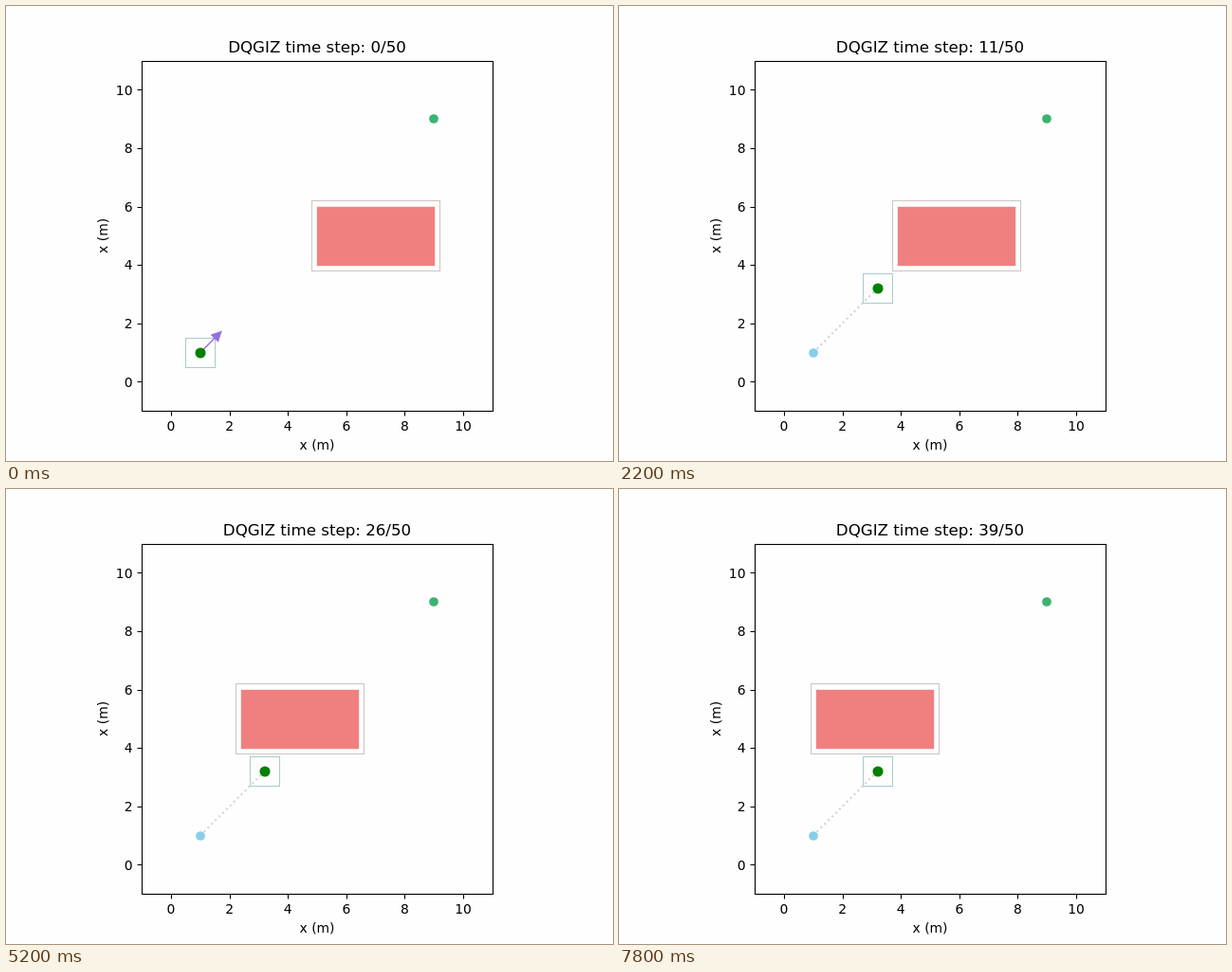
An HTML page that plays this animation: 640x480 px, repeating every 8000 ms.

```html
<!DOCTYPE html>
<html lang="en">
<head>
<meta charset="utf-8">
<title>Path planning plot</title>
<style>
  html, body { margin: 0; width: 100%; height: 100%; overflow: hidden; background: #fefefe; }
  svg { display: block; width: 640px; height: 480px; }
  text { font: 13.89px "DejaVu Sans", sans-serif; fill: #000; text-anchor: middle; }
  #title { font-size: 16.67px; }
  #yTicks text { text-anchor: end; }
  .axis { fill: none; stroke: #000; stroke-width: 1.11; }
  .outline { fill: none; stroke-width: 1; }
</style>
</head>
<body>
<svg viewBox="0 0 640 480">
  <rect id="margin" class="outline" stroke="#cdc4c4"/>
  <rect id="obstacle" fill="#f08080" stroke="#f08080" stroke-width="1.39"/>
  <rect id="robotBox" class="outline" stroke="#a8cccb"/>
  <path id="arrow" fill="#9370db" stroke="#9370db" stroke-width="1.39"/>
  <path id="trail" fill="none" stroke="#d3d3d3" stroke-width="2.08" stroke-dasharray="2.08 3.44"/>
  <circle id="start" r="4.86" fill="#87ceeb"/>
  <circle id="goal" r="4.86" fill="#3cb371"/>
  <circle id="robot" r="5.56" fill="#008000"/>
  <rect id="frame" class="axis"/>
  <path id="ticks" class="axis"/>
  <g id="xTicks"></g>
  <g id="yTicks"></g>
  <text x="328" y="468">x (m)</text>
  <text transform="translate(107 242.4) rotate(-90)">x (m)</text>
  <text id="title" x="328" y="49"></text>
</svg>
<script>
const STEP_MS = 200, STEPS = 40, TOTAL = 50;
const STOP_STEP = 11;
const UNIT = 30.8;

const $ = id => document.getElementById(id);
const px = x => 174 + UNIT * x;
const py = y => 396.4 - UNIT * y;
const snap = v => Math.floor(v + 0.5 + 1e-6) + 0.5;

function set(id, attrs) {
  for (const key in attrs) $(id).setAttribute(key, attrs[key]);
}

// Rectangle given by its data bounds, aligned to pixel centres.
function setRect(id, x0, y0, x1, y1) {
  const left = snap(px(x0)), top = snap(py(y1));
  set(id, { x: left, y: top, width: snap(px(x1)) - left, height: snap(py(y0)) - top });
}

function setDot(id, x, y) {
  set(id, { cx: Math.round(px(x)), cy: Math.round(py(y)) });
}

function addLabel(group, value, x, y) {
  const label = document.createElementNS(group.namespaceURI, "text");
  label.setAttribute("x", x);
  label.setAttribute("y", y);
  label.textContent = value;
  group.append(label);
}

function drawAxes() {
  let ticks = "";
  for (let v = 0; v <= 10; v += 2) {
    ticks += `M${snap(px(v))} 427.5v5M143.5 ${snap(py(v))}h-5`;
    addLabel($("xTicks"), v, px(v), 448);
    addLabel($("yTicks"), v, 133.5, Math.round(py(v) + 5.2));
  }
  set("ticks", { d: ticks });
  setRect("frame", -1, -1, 11, 11);
  setDot("start", 1, 1);
  setDot("goal", 9, 9);
}

function drawArrow(p) {
  const shaft = 0.5 * Math.SQRT2 * UNIT, head = 0.3 * UNIT;
  set("arrow", {
    d: `M0 0H${shaft}V${-head / 2}L${shaft + head} 0L${shaft} ${head / 2}V0Z`,
    transform: `translate(${px(p)} ${py(p)}) rotate(-45)`
  });
}

function drawStep(step) {
  const p = 1 + 0.2 * Math.min(step, STOP_STEP);
  const left = 5 - 0.1 * step;

  setRect("obstacle", left, 4, left + 4, 6);
  setRect("margin", left - 0.2, 3.8, left + 4.2, 6.2);
  setRect("robotBox", p - 0.5, p - 0.5, p + 0.5, p + 0.5);
  setDot("robot", p, p);
  set("trail", { d: `M${px(1)} ${py(1)}L${px(p)} ${py(p)}` });
  drawArrow(p);
  $("arrow").style.display = step < STOP_STEP ? "" : "none";
  $("title").textContent = `DQGIZ time step: ${step}/${TOTAL}`;
}

let shown = 0;
function tick(now) {
  const step = Math.floor(now / STEP_MS) % STEPS;
  if (step !== shown) drawStep(shown = step);
  requestAnimationFrame(tick);
}

drawAxes();
drawStep(shown);
requestAnimationFrame(tick);
</script>
</body>
</html>
```
